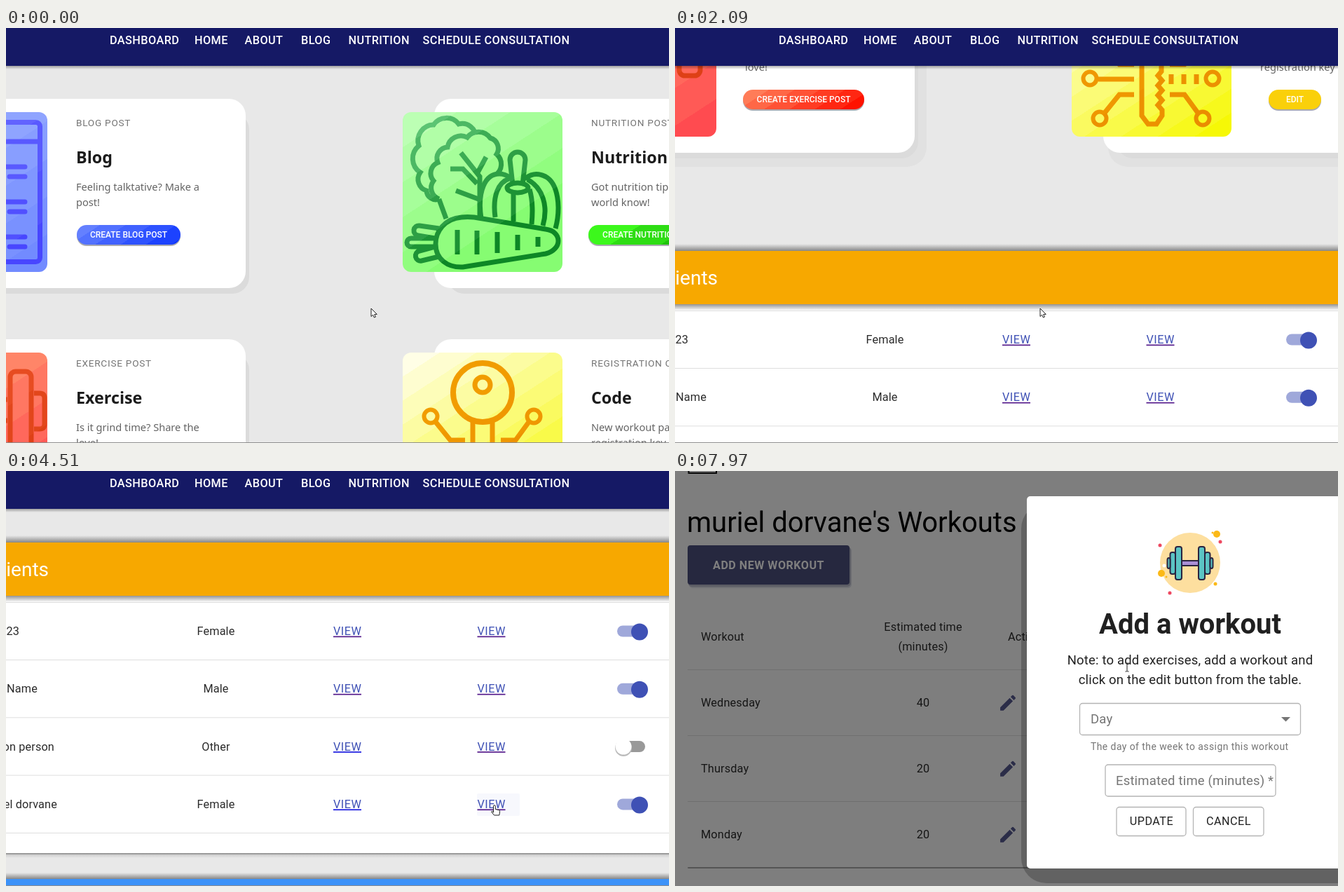
Recreate the animation shown at these times as an HTML page. Size 946x592 px, loop 8 s.

```html
<!DOCTYPE html>
<html lang="en">
<head>
<meta charset="utf-8">
<title>Fitness dashboard</title>
<style>
  html, body { margin: 0; width: 100%; height: 100%; overflow: hidden; background: #e8e8e8; }
  svg { display: block; width: 946px; height: 592px; --bg: #e8e8e8; --card: #fff; }
  text { font-family: Roboto, sans-serif; white-space: pre; }
  .nav { font-size: 16.3px; font-weight: 500; letter-spacing: .39px; fill: #fff; }
  .label { font-size: 13.6px; letter-spacing: .75px; fill: #757575; }
  .title { font: 700 23.3px "Noto Sans", sans-serif; fill: #1c1c1c; }
  .body { font: 14.6px "Noto Sans", sans-serif; fill: #646464; }
  .pill { font-size: 12px; font-weight: 500; fill: #fff; }
  .cell { font-size: 16.25px; letter-spacing: .15px; fill: #2b2b2b; }
  .view { font-size: 16.25px; letter-spacing: .46px; fill: #3f51b5; }
  .field { font-size: 18.5px; letter-spacing: .17px; fill: #757575; }
  .note { font-size: 18.5px; letter-spacing: .17px; fill: #222; }
  .help { font-size: 13.9px; letter-spacing: .46px; fill: #757575; }
  .btn { font-size: 16.2px; letter-spacing: .46px; fill: #222; }
</style>
</head>
<body>
<svg id="stage" viewBox="0 0 946 592" xmlns="http://www.w3.org/2000/svg"></svg>
<script>
const LOOP = 8000;
const stage = document.getElementById('stage');
const $ = id => document.getElementById(id);

const text = (x, y, str, cls, anchor = 'start', extra = '') =>
  `<text x="${x}" y="${y}" class="${cls}" text-anchor="${anchor}" ${extra}>${str}</text>`;
const rect = (x, y, w, h, fill, r = 0, extra = '') =>
  `<rect x="${x}" y="${y}" width="${w}" height="${h}" rx="${r}" fill="${fill}" ${extra}/>`;
const circle = (x, y, r, extra) => `<circle cx="${x}" cy="${y}" r="${r}" ${extra}/>`;

// Gradient made of n flat diagonal bands
function bands(id, from, to, n, line) {
  const rgb = c => [1, 3, 5].map(i => parseInt(c.substr(i, 2), 16));
  const a = rgb(from), b = rgb(to);
  let stops = '';
  for (let i = 0; i < n; i++) {
    const c = a.map((v, k) => Math.round(v + (b[k] - v) * i / (n - 1)));
    for (const o of [i / n, (i + 1) / n]) stops += `<stop offset="${o}" stop-color="rgb(${c})"/>`;
  }
  const [x1, y1, x2, y2] = line;
  return `<linearGradient id="${id}" gradientUnits="userSpaceOnUse" x1="${x1}" y1="${y1}" x2="${x2}" y2="${y2}">${stops}</linearGradient>`;
}
const tileLine = [28, -18, 200, 246], pillLine = [222, 180, 286, 279];
const fade = (id, y1, y2, op) =>
  `<linearGradient id="${id}" x1="0" x2="0" y1="${y1}" y2="${y2}"><stop stop-opacity="${op}"/><stop offset="1" stop-opacity="0"/></linearGradient>`;

const defs = '<defs>' +
  bands('blue', '#9db0ff', '#728bff', 7, tileLine) + bands('blueInk', '#6a6cff', '#4846ff', 5, tileLine) +
  bands('green', '#bcffb4', '#86fc72', 6, [28, -18, 165, 192]) + bands('greenInk', '#5cc473', '#0d8726', 6, [28, -18, 165, 192]) +
  bands('red', '#ffa274', '#ff4b50', 7, tileLine) + bands('redInk', '#f0582c', '#d93a10', 6, tileLine) +
  bands('yellow', '#fffee6', '#f6f806', 11, tileLine) + bands('yellowInk', '#f3a100', '#ea8c00', 5, tileLine) +
  bands('bluePill', '#6480ff', '#0a33ff', 6, pillLine) +
  bands('greenPill', '#3cf81c', '#20c20c', 3, pillLine) +
  bands('redPill', '#ff7c58', '#ff1200', 6, pillLine) +
  bands('yellowPill', '#fad00a', '#fad00a', 2, pillLine) +
  fade('down', 0, 1, .42) + fade('up', 1, 0, .42) + '</defs>';

// Leaf edge: an outward arc between each pair of points
function bumps(pts) {
  let d = 'M' + pts[0];
  for (let i = 1; i < pts.length; i++) {
    const r = .62 * Math.hypot(pts[i][0] - pts[i - 1][0], pts[i][1] - pts[i - 1][1]);
    d += `A${r} ${r} 0 0 1 ${pts[i]}`;
  }
  return d;
}
const backLeaf = bumps([[52, 124], [34, 112], [25, 86], [23, 48], [44, 18], [80, 17], [104, 36]]);
const frontLeaf = bumps([[52, 124], [44, 98], [50, 72], [64, 50], [92, 36], [125, 37], [134, 60], [132, 90]]);

const icons = {
  blue: rect(10.5, 14.5, 207, 199, 'none', 6) +
    `<path stroke-linecap="round" d="M10 42H217` +
    [0, 50, 100].map(d => `M120 ${78 + d}H196M174 ${92 + d}H196`).join('') + '"/>',
  green: `<path d="${backLeaf}"/><path d="M62 152L51 122"/><path fill="url(#green)" d="${frontLeaf}"/>
    <path d="M110 152V92L83 58M106 88L119 64M68 81H86L106 102M76 112L108 124"/>
    <path fill="url(#green)" d="M112 152C106 112 118 88 138 88Q146 88 154 94H176C186 86 196 88 204 92C222 102 226 136 218 166"/>
    <path d="M132 150C128 120 136 100 152 95M158 156V112M181 110Q187 130 184 160M178 96C200 108 208 134 200 162"/>
    <path fill="url(#green)" d="M157 104L153 68A11 11 0 0 1 175 68L171 104"/>
    <ellipse cx="164" cy="108" rx="15" ry="7" fill="url(#green)"/>
    <path d="M52 166L24 162a7 7 0 0 0-2 14l24 4H12a6 6 0 0 0 0 12H46L24 198a7 7 0 0 0 3 14L52 206"/>
    <path fill="url(#green)" d="M84 150C60 152 47 170 47 188C47 210 64 222 86 221L204 202C228 196 228 170 204 167L102 150Q92 149 84 150Z"/>
    <path d="M78 168v35M106 169v34M135 171v30M164 175v22M193 178v14"/>`,
  red: `<path d="M100 67H171M100 97H171M209 58h8q7 0 7 7v37q0 7-7 7h-8"/>` + rect(175, 27, 30, 114, 'none', 8),
  yellow: circle(114, 57, 42, 'stroke-width="8"') + circle(114, 46, 11) +
    [[40, 91], [187, 91], [26, 145], [201, 145], [40, 202], [187, 202]].map(p => circle(...p, 9.5, 'stroke-width="6"')).join('') +
    `<path d="M100 98V198l9 12h12l8-12v-8l-6-7 6-7-6-7 6-7-6-7 6-7-6-7 5-6V98"/>
    <path d="M47 99L68 125H89M180 99L161 125H140M38 146H89M47 194L68 168H89M180 194L161 168H140M142 139v14M160 139v14M178 139v14"/>`
};

function card(x, y, hue, label, title, lines, action, mid, w) {
  return `<g transform="translate(${x} ${y})">` +
    rect(7, 20, 476, 270, '#e1e1e1', 28, 'class="halo"') + rect(19, 20, 452, 258, '#dbdbdb', 24) +
    rect(0, 0, 466, 270, 'var(--card)', 24) +
    `<g transform="translate(-45 19)" fill="none" stroke="url(#${hue}Ink)" stroke-width="7">` +
    rect(0, 0, 228, 228, `url(#${hue})`, 12, 'stroke="none"') + icons[hue] + '</g>' +
    text(224, 39, label, 'label') + text(224, 92, title, 'title') +
    text(224, 131, lines[0], 'body') + text(224, 153, lines[1], 'body') +
    rect(mid - w / 2, 182, w, 28, '#a9a9b0', 14) + rect(mid - w / 2, 180, w, 28, `url(#${hue}Pill)`, 14) +
    text(mid, 198, action, 'pill', 'middle') + '</g>';
}

const cards =
  card(-124, 101, 'blue', 'BLOG POST', 'Blog', ['Feeling talktative? Make a', 'post!'], 'CREATE BLOG POST', 299, 148) +
  card(611, 101, 'green', 'NUTRITION POST', 'Nutrition', ['Got nutrition tips? Let the', 'world know!'], 'CREATE NUTRITION POST', 311, 182) +
  card(-124, 444, 'red', 'EXERCISE POST', 'Exercise', ['Is it grind time? Share the', 'love!'], 'CREATE EXERCISE POST', 307.5, 173) +
  card(611, 444, 'yellow', 'REGISTRATION CODE', 'Code', ['New workout pack? Edit the', 'registration key'], 'EDIT', 273.5, 75);

const view = (x, y, visited) =>
  text(x, y, 'VIEW', 'view') + rect(x, y + 1.5, 40, 1.7, visited ? '#551a8b' : '#1a1ae0');

function toggle(y, on) {
  return rect(872, y - 8, 40, 16, on ? '#9fa8da' : '#999', 8) +
    (on ? circle(904, y + 1, 12, 'fill="#3f51b5"')
        : circle(881, y + 2, 12, 'fill="#bbb"') + circle(881, y, 11.5, 'fill="#fff"'));
}

const clients = [['user23', 19, 'Female', 1, 1], ['Test Name', 45, 'Male', 1, 1],
  ['common person', 69, 'Other', 0, 0], ['muriel dorvane', 73, 'Female', 0, 1]];
const rows = clients.map(([name, end, sex, seen, on], i) => {
  const y = 939 + i * 82.3;
  return rect(0, y + 82, 946, 1, '#dedede') +
    (i === 3 ? rect(672, y + 26, 61, 32, '#f7f8fd', 2, 'id="hover"') : '') +
    text(end, y + 47, name, 'cell', 'end') + text(299.5, y + 47, sex, 'cell', 'middle') +
    view(467, y + 47, seen) + view(672.5, y + 47, true) + toggle(y + 41.5, on);
}).join('');

const dashboard = `<g id="dashboard">` + rect(0, 0, 946, 592, 'var(--bg)') + `<g id="scroll">` + cards +
  rect(0, 930, 946, 367, '#fff') + rect(0, 1297, 946, 1.6, '#999') + rect(0, 1298, 946, 6, 'url(#down)', 0, 'opacity=".35"') +
  rect(0, 844, 946, 10, 'url(#up)') + rect(0, 930, 946, 9, 'url(#down)') + rect(0, 939, 946, 1, '#dedede') +
  rect(0, 854, 946, 76, '#f7a800') + text(61, 902, 'Clients', '', 'end', 'font-size="28" fill="#fff"') + rows +
  rect(0, 1325, 946, 9, 'url(#up)') + rect(0, 1334, 946, 76, '#3d93f8') + '</g>' +
  rect(0, 54, 946, 5, 'url(#down)', 0, 'opacity=".75"') + rect(0, 0, 946, 54, '#151965') +
  [[148, 'DASHBOARD'], [269, 'HOME'], [340.5, 'ABOUT'], [421, 'BLOG'], [488.5, 'NUTRITION'], [594.5, 'SCHEDULE CONSULTATION']]
    .map(([x, s]) => text(x, 22.5, s, 'nav')).join('') +
  rect(0, 591, 946, 1, '#8f8f8f') + '</g>';

const pencil = 'M3 17.25V21h3.75L17.81 9.94l-3.75-3.75L3 17.25zM20.71 7.04a1 1 0 0 0 0-1.41l-2.34-2.34a1 1 0 0 0-1.41 0l-1.83 1.83 3.75 3.75 1.83-1.83z';
const bin = 'M6 19c0 1.1.9 2 2 2h8c1.1 0 2-.9 2-2V7H6v12zM19 4h-3.5l-1-1h-5l-1 1H5v2h14V4z';
const glyph = (d, x, y, fill) => `<path d="${d}" fill="${fill}" transform="translate(${x - 14.6} ${y - 14.4}) scale(1.22)"/>`;

const plan = [['Wednesday', 40], ['Thursday', 20], ['Monday', 20]].map(([day, mins], i) => {
  const y = 330 + i * 94;
  return rect(18, y - 47, 560, 1, '#e0e0e0') + text(37, y + 6, day, 'cell') + text(354, y + 6, mins, 'cell', 'middle') +
    glyph(pencil, 475, y + .5, '#575a92') + glyph(bin, 531, y + .5, '#ff4b4b');
}).join('');

const workouts = `<g id="workouts">` + rect(0, 0, 946, 592, '#fefefe') + `<g id="pan">` +
  rect(19.5, -30, 39.5, 33, 'none', 0, 'stroke="#111" stroke-width="2"') +
  text(17, 87, "muriel dorvane's Workouts", '', 'start', 'font-size="40" fill="#000"') +
  rect(20, 109, 232, 58, '#dfe1ea', 5) + rect(19, 108, 232, 57, '#b9bccb', 5) +
  rect(18, 106, 231, 56, '#525583', 4, 'id="add"') +
  text(133.5, 139.7, 'ADD NEW WORKOUT', '', 'middle', 'font-size="16.1" font-weight="700" letter-spacing=".5" fill="#fff"') +
  `<path d="M578 193V561q0 4.500-4.500 4.500" fill="none" stroke="#dcdcdc"/>` + rect(18, 565, 559, 2, '#aaa', 1) +
  text(37, 242, 'Workout', 'cell') + text(354, 228, 'Estimated time', 'cell', 'middle') +
  text(354, 256, '(minutes)', 'cell', 'middle') + text(503, 242, 'Actions', 'cell', 'middle') + plan + '</g>' +
  `<path id="edge" d="M0 .5H946M.5 0V592" stroke="#777"/></g>`;

const box = (x, y, w, h) => rect(x + .5, y + .5, w - 1, h - 1, 'none', 4, 'stroke="#b4b4b4" stroke-width="1.3"');
const weights = [[714, 108, 9, 47], [706.5, 116, 7.5, 31], [702.5, 124, 4, 15]]
  .map(([x, y, w, h]) => [x, 1470 - x - w].map(v => rect(v, y, w, h, '#5bc4c4', 3)).join('')).join('');
const dots = [[692, 106, 2.5, 0], [778, 101, 2.5, 0], [706, 174, 2.5, 0], [773, 90, 5, 1], [694, 146, 5, 1],
  [767, 88, 1.5, 1], [771, 161, 2.5, 1], [701, 151, 1.5, 1], [698, 135, 2.5, 2]]
  .map(([x, y, r, c]) => circle(x, y, r, `fill="${['#ee4860', '#fbb917', '#fff'][c]}"`)).join('');

const dialog = `<g id="dialog">` + rect(0, 0, 946, 592, '#000', 0, 'opacity=".5"') +
  rect(494, 46, 500, 542, '#000', 36, 'opacity=".22"') + rect(502, 36, 466, 531, '#fff', 5) +
  circle(735, 131, 43, 'fill="#fddf9f"') + dots +
  `<g stroke="#2b2440" stroke-width="2">` + rect(722, 128, 26, 7, '#a98fd6') + weights + '</g>' +
  text(735, 231.5, 'Add a workout', '', 'middle', 'font-size="40" font-weight="700" fill="#202020"') +
  text(735, 276, 'Note: to add exercises, add a workout and', 'note', 'middle') +
  text(735, 304, 'click on the edit button from the table.', 'note', 'middle') +
  box(577, 331, 316, 46) + text(593, 360, 'Day', 'field') + `<path d="M865 351h13l-6.500 6.500z" fill="#757575"/>` +
  text(593, 397.5, 'The day of the week to assign this workout', 'help') +
  box(613.5, 418.5, 244, 46) + text(629, 447.5, 'Estimated time (minutes) *', 'field') +
  box(629.5, 479, 100, 42) + text(680, 505, 'UPDATE', 'btn', 'middle') +
  box(739, 479, 101.5, 42) + text(790, 505, 'CANCEL', 'btn', 'middle') + '</g>';

const pointers = `<g id="mouse">
  <path id="arrow" d="M0 0V11.500L2.600 9.200L4.400 13L6.400 12.100L4.700 8.400H8.300Z" fill="#fff" stroke="#222"/>
  <path id="hand" d="M-1.500 10V1.200a1.400 1.400 0 0 1 2.800 0V5.500l5 1.200q1.500.4 1.300 2l-.8 5.300H-.5L-4.500 9q.8-1.600 3 1Z" fill="#fff" stroke="#222"/>
  <path id="beam" d="M-2.500-6H-.5L0-5.500.5-6H2.500M0-5.500V5.500M-2.500 6H-.5L0 5.500.5 6H2.500" fill="none" stroke="#222"/></g>`;

stage.innerHTML = defs + dashboard + workouts + dialog + pointers;
const halos = stage.querySelectorAll('.halo');

// Screen refresh bursts: start, end, number of steps
const bursts = [[500, 1430, 8], [1550, 2360, 7], [3190, 4210, 9], [4360, 5350, 8],
  [5470, 5470, 2], [6340, 6760, 4], [7040, 7190, 2], [7580, 7970, 4]];
function held(t) {
  let at = 0;
  for (const [a, b, n] of bursts) {
    if (t < a) break;
    const gap = (b - a) / (n - 1) || 1;
    at = Math.min(b, a + Math.floor((t - a) / gap + 1e-6) * gap);
  }
  return at;
}

// Linear value along [time, value] keys
function track(t, keys) {
  if (t <= keys[0][0]) return keys[0][1];
  for (let i = 1; i < keys.length; i++) {
    const [t0, v0] = keys[i - 1], [t1, v1] = keys[i];
    if (t < t1) return v0 + (v1 - v0) * (t - t0) / (t1 - t0);
  }
  return keys[keys.length - 1][1];
}

const scrollKeys = [[370, 0], [765, 77], [1550, 318], [2360, 645], [3060, 645], [3560, 752]];
const panKeys = [[6339, -258], [6340, -91], [6480, -45], [6620, -12], [6760, 0]];
const mouseX = [[3560, 521], [4210, 697], [4780, 697], [5350, 198], [5470, 198], [5471, 140], [7450, 140], [7970, 645]];
const mouseY = [[3560, 400], [4210, 477], [4780, 477], [5350, 3], [5470, 3], [5471, 130], [7450, 130], [7970, 280]];

const show = (el, on) => el.setAttribute('display', on ? 'inline' : 'none');
const move = (el, x, y) => el.setAttribute('transform', `translate(${x} ${y})`);

function draw(time) {
  const t = held(time);
  const scroll = Math.round(track(t, scrollKeys));
  const onWorkouts = t >= 4780;
  const flat = t > 640 && t < 1180;

  stage.style.setProperty('--bg', flat ? '#f3f3f3' : '#e8e8e8');
  stage.style.setProperty('--card', flat ? '#f3f3f3' : '#fff');
  move($('scroll'), 0, -scroll);
  halos.forEach(h => show(h, scroll > 500));
  show($('dashboard'), !onWorkouts);
  show($('hover'), t >= 4360);

  show($('workouts'), onWorkouts);
  move($('pan'), track(t, panKeys), 0);
  show($('edge'), t >= 6340 && t < 6760);
  $('add').setAttribute('fill', t >= 7040 ? '#4d507e' : '#525583');

  const open = track(t, [[7450, 0], [7970, 1]]);
  show($('dialog'), open > 0);
  $('dialog').setAttribute('opacity', open);

  show($('mouse'), t < 5470 || t >= 7040);
  move($('mouse'), track(t, mouseX), track(t, mouseY));
  const hand = (t >= 4200 && t < 4780) || (t >= 7040 && t < 7580), beam = t >= 7960;
  show($('hand'), hand);
  show($('beam'), beam);
  show($('arrow'), !hand && !beam);
}

const begin = performance.now();
function loop() {
  draw((performance.now() - begin) % LOOP);
  requestAnimationFrame(loop);
}
draw(0);
requestAnimationFrame(loop);
</script>
</body>
</html>
```
